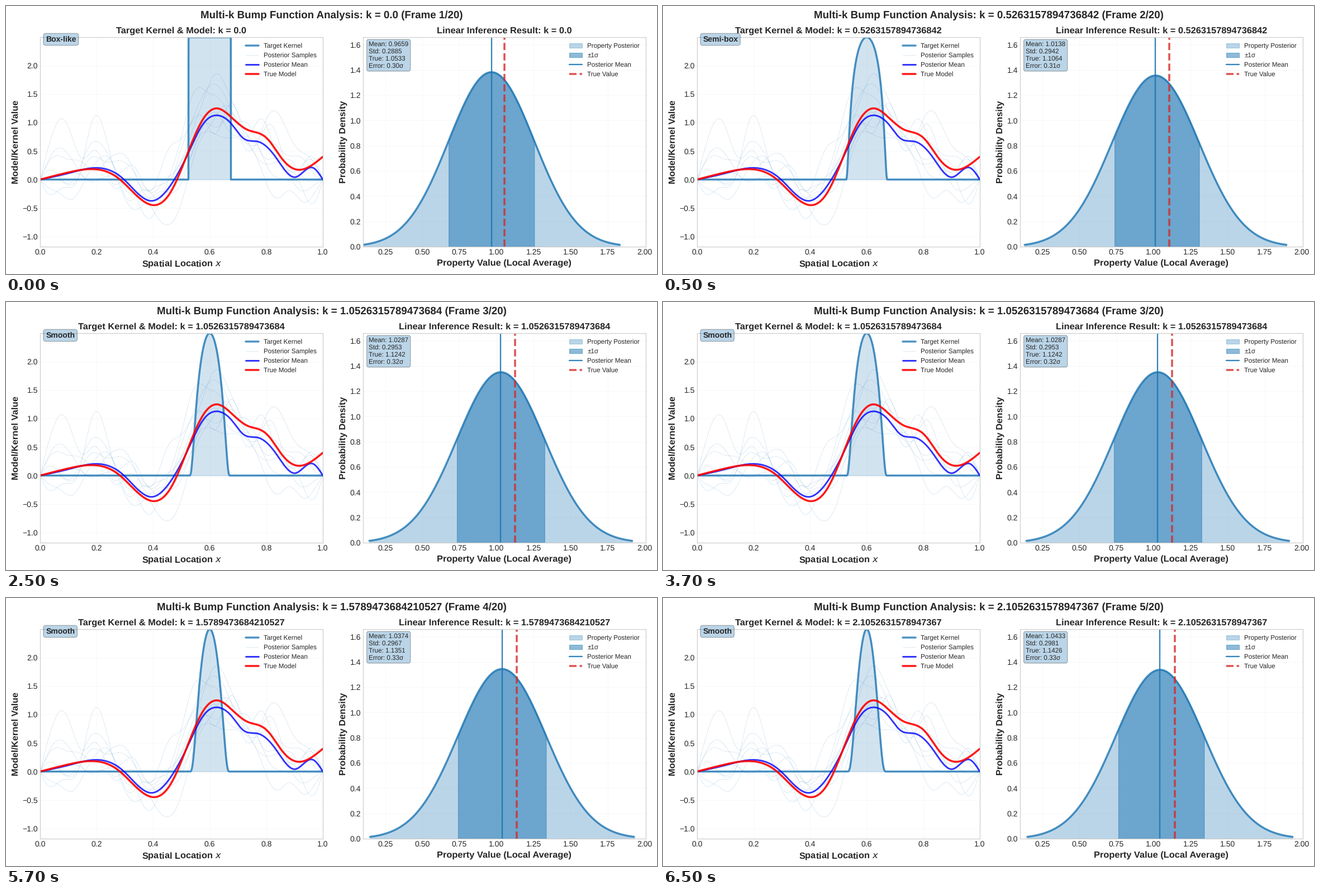
A matplotlib script for the animation above (8 s loop, 1165 px wide and 481 px high).

```python
import numpy as np
import matplotlib.pyplot as plt
from matplotlib.animation import FuncAnimation

W, H = 1165, 481
PT = 1.168          # pixels per nominal point; at 72 dpi one point is one pixel
BLUE, RED = "#1f77b4", "#d62728"
INK = "0.15"

plt.rcParams.update({
    "font.family": "Liberation Sans",
    "font.size": 10 * PT,
    "text.hinting": "no_hinting",
    "text.color": INK,
    "axes.labelcolor": INK,
    "axes.edgecolor": "0.8",
    "axes.linewidth": PT,
    "axes.axisbelow": True,
    "axes.labelsize": 14 * PT,
    "axes.labelweight": "bold",
    "axes.labelpad": 4 * PT,
    "axes.titlesize": 14 * PT,
    "axes.titleweight": "bold",
    "axes.titlepad": 6 * PT,
    "grid.color": "0.8",
    "grid.linewidth": PT,
    "grid.alpha": 0.1,
    "lines.solid_capstyle": "round",
    "patch.linewidth": PT,
    "legend.fontsize": 10 * PT,
    "legend.frameon": False,
})
for tick in ("xtick", "ytick"):
    plt.rcParams.update({
        f"{tick}.color": INK,
        f"{tick}.labelsize": 12 * PT,
        f"{tick}.major.size": 0,
        f"{tick}.major.pad": 3.5 * PT,
    })

# Key points (x, value) of the two model curves
TRUE_MODEL = [
    (0, 0), (.1, .125), (.19, .182), (.275, .03), (.34, -.275), (.4, -.45),
    (.46, -.235), (.525, .5), (.575, 1.05), (.626, 1.25), (.676, 1.095),
    (.735, .87), (.77, .82), (.803, .72), (.858, .35), (.907, .175), (1, .4),
]
MEAN_MODEL = [
    (0, 0), (.1, .11), (.19, .204), (.29, .03), (.35, -.265), (.395, -.375),
    (.45, -.18), (.525, .475), (.575, .965), (.634, 1.122), (.677, .975),
    (.72, .72), (.77, .667), (.83, .415), (.903, .042), (.963, .21), (1, 0),
]

# Posterior mean, posterior std, true value, first index of the 1-sigma band
STEPS = [
    (0.9659, 0.2885, 1.0533, 33),
    (1.0138, 0.2942, 1.1064, 34),
    (1.0287, 0.2953, 1.1242, 33),
    (1.0374, 0.2967, 1.1351, 33),
    (1.0433, 0.2981, 1.1426, 34),
]
KS = np.linspace(0, 10, 20)


def spline(points, x):
    """Natural cubic spline through the points."""
    xs, ys = np.array(points, float).T
    n, h = len(xs), np.diff(xs)
    a, rhs = np.eye(n), np.zeros(n)
    for i in range(1, n - 1):
        a[i, i - 1:i + 2] = h[i - 1], 2 * (h[i - 1] + h[i]), h[i]
        rhs[i] = 6 * ((ys[i + 1] - ys[i]) / h[i] - (ys[i] - ys[i - 1]) / h[i - 1])
    m = np.linalg.solve(a, rhs)
    i = np.clip(np.searchsorted(xs, x) - 1, 0, n - 2)
    lo, hi, d = x - xs[i], xs[i + 1] - x, h[i]
    return ((m[i] * hi**3 + m[i + 1] * lo**3) / (6 * d)
            + (ys[i] / d - m[i] * d / 6) * hi
            + (ys[i + 1] / d - m[i + 1] * d / 6) * lo)


def posterior_samples(x, mean, count=8, modes=24, spread=0.3):
    """Random sine series around the mean, pinned at both ends."""
    rng = np.random.default_rng(4)
    j = np.arange(1, modes + 1)
    scale = np.exp(-(j / 14) ** 2)
    scale *= spread / np.sqrt(np.sum(scale**2) / 2)
    return mean + rng.normal(0, scale, (count, modes)) @ np.sin(np.pi * np.outer(j, x))


def bump(x, k, center=0.6, radius=0.075, peak=2.5):
    u2 = ((x - center) / radius) ** 2
    inside = u2 < 1
    y = np.zeros_like(x)
    y[inside] = peak * np.exp(-k * u2[inside] / (1 - u2[inside]))
    return y


def shape_name(k):
    return "Box-like" if k < 0.5 else "Semi-box" if k < 1 else "Smooth"


X = np.linspace(0, 1, 2001)
true_y = spline(TRUE_MODEL, X)
mean_y = spline(MEAN_MODEL, X)
sample_ys = posterior_samples(X, mean_y)

fig = plt.figure(figsize=(W / 72, H / 72), dpi=72, facecolor="white")


def add_axes(left, right, top=56, bottom=432):
    return fig.add_axes([left / W, 1 - bottom / H, (right - left) / W, (bottom - top) / H])


model_ax = add_axes(61, 567)
prop_ax = add_axes(639, 1144.5)
heading = fig.text(0.5, 1 - 22.5 / H, "", ha="center", size=16 * PT, weight="bold")


def setup(ax, title, xlabel, ylabel, xlim, ylim, xticks, yticks):
    ax.set_title(title)
    ax.set_xlabel(xlabel)
    ax.set_ylabel(ylabel)
    ax.set_xticks(xticks)
    ax.set_yticks(yticks)
    ax.set_xlim(*xlim)
    ax.set_ylim(*ylim)
    ax.grid(True)
    ax.legend(loc="upper right")


def note(ax, text, **kw):
    ax.text(0.02, 0.98, text, transform=ax.transAxes,
            bbox=dict(boxstyle="round,pad=0.3", facecolor=BLUE, alpha=0.3), **kw)


def draw_model(k):
    ax = model_ax
    ax.clear()
    kernel = bump(X, k)
    ax.fill_between(X, kernel, color=BLUE, alpha=0.2)
    ax.plot(X, kernel, color=BLUE, lw=3 * PT, alpha=0.8, label="Target Kernel")
    for i, y in enumerate(sample_ys):
        ax.plot(X, y, color=BLUE, lw=0.5 * PT, alpha=0.25,
                label="Posterior Samples" if i == 0 else None)
    ax.plot(X, mean_y, color="blue", lw=2.5 * PT, alpha=0.8, label="Posterior Mean")
    ax.plot(X, true_y, color="red", lw=3 * PT, alpha=0.9, label="True Model")
    note(ax, shape_name(k), size=12 * PT, weight="bold")
    setup(ax, f"Target Kernel & Model: k = {k}", "Spatial Location $x$", "Model/Kernel Value",
          (0, 1), (-1.18, 2.5), np.arange(6) / 5, np.arange(-2, 5) / 2)


def draw_property(k, mean, std, true, first):
    ax = prop_ax
    ax.clear()
    x = np.linspace(mean - 3 * std, mean + 3 * std, 100)
    pdf = np.exp(-0.5 * ((x - mean) / std) ** 2) / (std * np.sqrt(2 * np.pi))
    band = slice(first, 67)
    ax.fill_between(x, pdf, color=BLUE, alpha=0.3, label="Property Posterior")
    ax.fill_between(x[band], pdf[band], color=BLUE, alpha=0.5, label="±1σ")
    ax.plot(x, pdf, color=BLUE, lw=3 * PT, alpha=0.8)
    ax.axvline(mean, color=BLUE, lw=2 * PT, alpha=0.9, label="Posterior Mean")
    ax.axvline(true, color=RED, lw=3 * PT, ls="--", alpha=0.8, label="True Value")
    note(ax, f"Mean: {mean:.4f}\nStd: {std:.4f}\nTrue: {true:.4f}\n"
             f"Error: {abs(true - mean) / std:.2f}σ", va="top")
    setup(ax, f"Linear Inference Result: k = {k}", "Property Value (Local Average)",
          "Probability Density", (0.1004, 2.005), (0, 1.6594),
          np.arange(1, 9) / 4, np.arange(9) / 5)


def update(n):
    step = (n + 3) // 4     # the first step is short, the others last up to four ticks
    k = float(KS[step])
    heading.set_text(f"Multi-k Bump Function Analysis: k = {k} (Frame {step + 1}/{len(KS)})")
    draw_model(k)
    draw_property(k, *STEPS[step])
    return []


anim = FuncAnimation(fig, update, frames=16, interval=500, repeat=True,
                     repeat_delay=0, blit=False)
plt.show()
```
